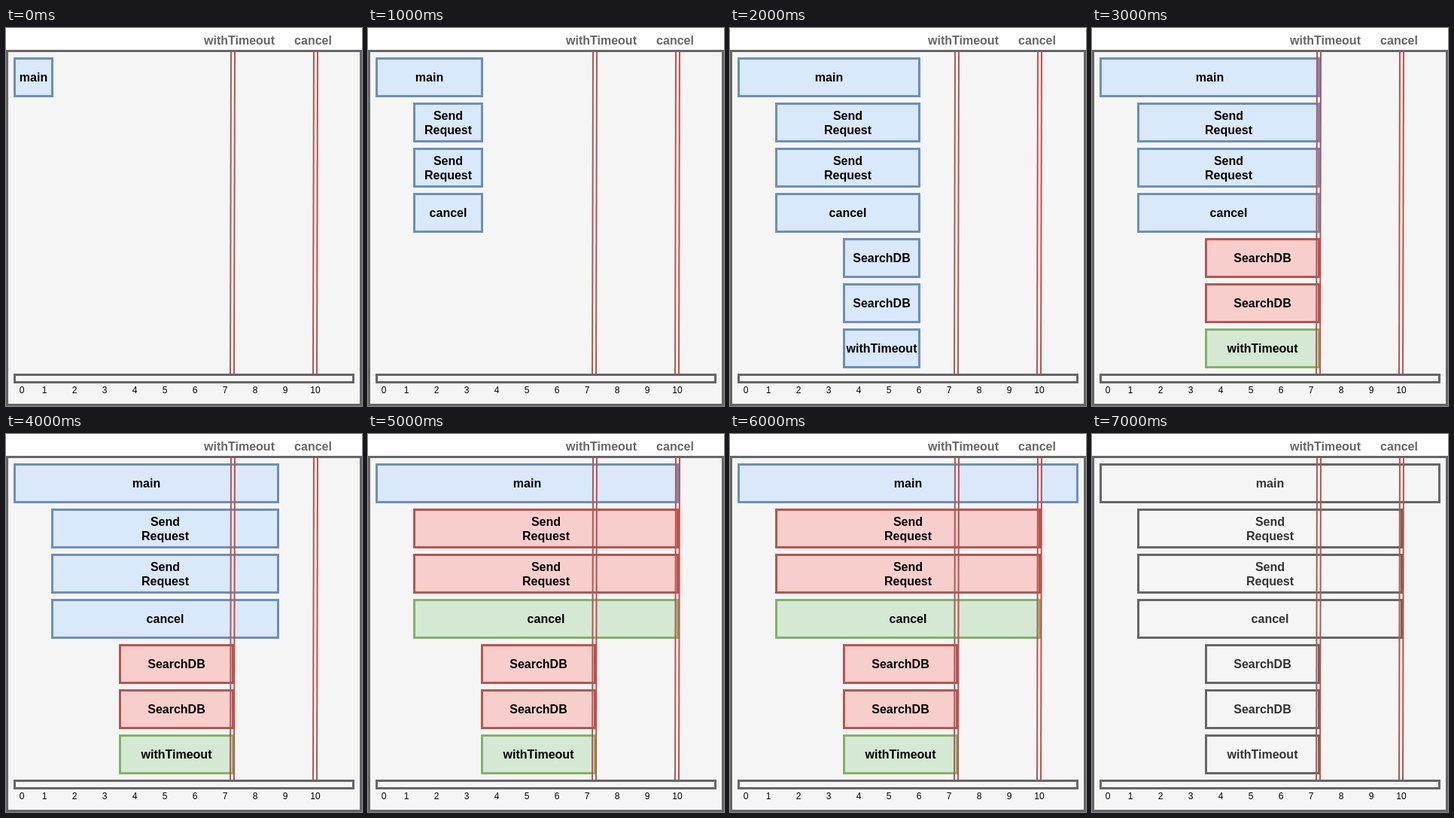
Write an HTML page that moves like this. It is 473x502 px and loops after 9 s.

```html
<!DOCTYPE html>
<html lang="en">
<head>
<meta charset="utf-8">
<title>Coroutine timeline</title>
<style>
  html, body { margin: 0; width: 100%; height: 100%; overflow: hidden; background: #fff; }
  svg { display: block; }
  text { font: bold 16px "Liberation Sans", Arial, sans-serif; text-anchor: middle; }
  .tick { font-weight: normal; font-size: 12px; }
  .head { fill: #666; }
  rect { stroke-width: 3; }
  .frame { fill: #f5f5f5; stroke: #666; }
  .limit { stroke: #b85450; stroke-width: 2; }
</style>
</head>
<body>
<svg id="stage" width="473" height="502" viewBox="0 0 473 502">
  <rect class="frame" x="1.5" y="30.5" width="470" height="470"/>
  <text class="head" x="310" y="22">withTimeout</text>
  <text class="head" x="408" y="22">cancel</text>
  <g id="bars"></g>
  <g id="limits"></g>
  <rect class="frame" x="11.5" y="460.5" width="450" height="10"/>
  <g id="ticks"></g>
</svg>
<script>
const LOOP = 9000, STEP = 1000;
const NS = "http://www.w3.org/2000/svg";

const STYLES = {
  active:    { fill: "#dae8fc", stroke: "#6c8ebf", ink: "#000" },
  cancelled: { fill: "#f8cecc", stroke: "#b85450", ink: "#000" },
  handler:   { fill: "#d5e8d4", stroke: "#82b366", ink: "#000" },
  done:      { fill: "#f5f5f5", stroke: "#666", ink: "#333" }
};

// Right edge of the running bars at each step.
const EDGES = [61.5, 151.5, 251.5, 301.5, 361.5, 411.5, 461.5, 461.5];
const DONE_STEP = EDGES.length - 1;

// Each job: label lines, left edge, first step, step at which it stops, style once stopped.
const job = (label, left, start, stop, ended) => ({ lines: label.split(" "), left, start, stop, ended });
const JOBS = [
  job("main", 11.5, 0, 6, "active"),
  job("Send Request", 61.5, 1, 5, "cancelled"),
  job("Send Request", 61.5, 1, 5, "cancelled"),
  job("cancel", 61.5, 1, 5, "handler"),
  job("SearchDB", 151.5, 2, 3, "cancelled"),
  job("SearchDB", 151.5, 2, 3, "cancelled"),
  job("withTimeout", 151.5, 2, 3, "handler")
];

function add(parent, tag, attrs, content = "") {
  const node = document.createElementNS(NS, tag);
  for (const key in attrs) node.setAttribute(key, attrs[key]);
  node.textContent = content;
  return parent.appendChild(node);
}

const byId = id => document.getElementById(id);

for (const x of [299, 304, 409, 414])
  add(byId("limits"), "line", { class: "limit", x1: x, y1: 31, x2: x - 1, y2: 460 });

for (let n = 0; n <= 10; n++)
  add(byId("ticks"), "text", { class: "tick", x: n ? 11 + 40 * n : 21, y: 485 }, n);

const bars = JOBS.map((item, row) => {
  const group = add(byId("bars"), "g", {});
  const y = 40.5 + 60 * row;
  const box = add(group, "rect", { x: item.left, y, height: 50 });
  const first = y + 30.5 - 9.5 * (item.lines.length - 1);
  const labels = item.lines.map((line, i) => add(group, "text", { y: first + 19 * i }, line));
  return { ...item, group, box, labels };
});

function show(step) {
  for (const bar of bars) {
    bar.group.style.display = step < bar.start ? "none" : "";
    if (step < bar.start) continue;
    const right = EDGES[Math.min(step, bar.stop)];
    const state = step >= DONE_STEP ? "done" : step >= bar.stop ? bar.ended : "active";
    const { fill, stroke, ink } = STYLES[state];
    bar.box.setAttribute("width", right - bar.left);
    bar.box.setAttribute("fill", fill);
    bar.box.setAttribute("stroke", stroke);
    for (const label of bar.labels) {
      label.setAttribute("x", (bar.left + right) / 2);
      label.setAttribute("fill", ink);
    }
  }
}

const origin = performance.now();
let shown = -1;

function tick(now) {
  const time = Math.max(0, now - origin) % LOOP;
  const step = Math.min(DONE_STEP, Math.floor(time / STEP));
  if (step !== shown) show(shown = step);
  requestAnimationFrame(tick);
}
tick(origin);
</script>
</body>
</html>
```
